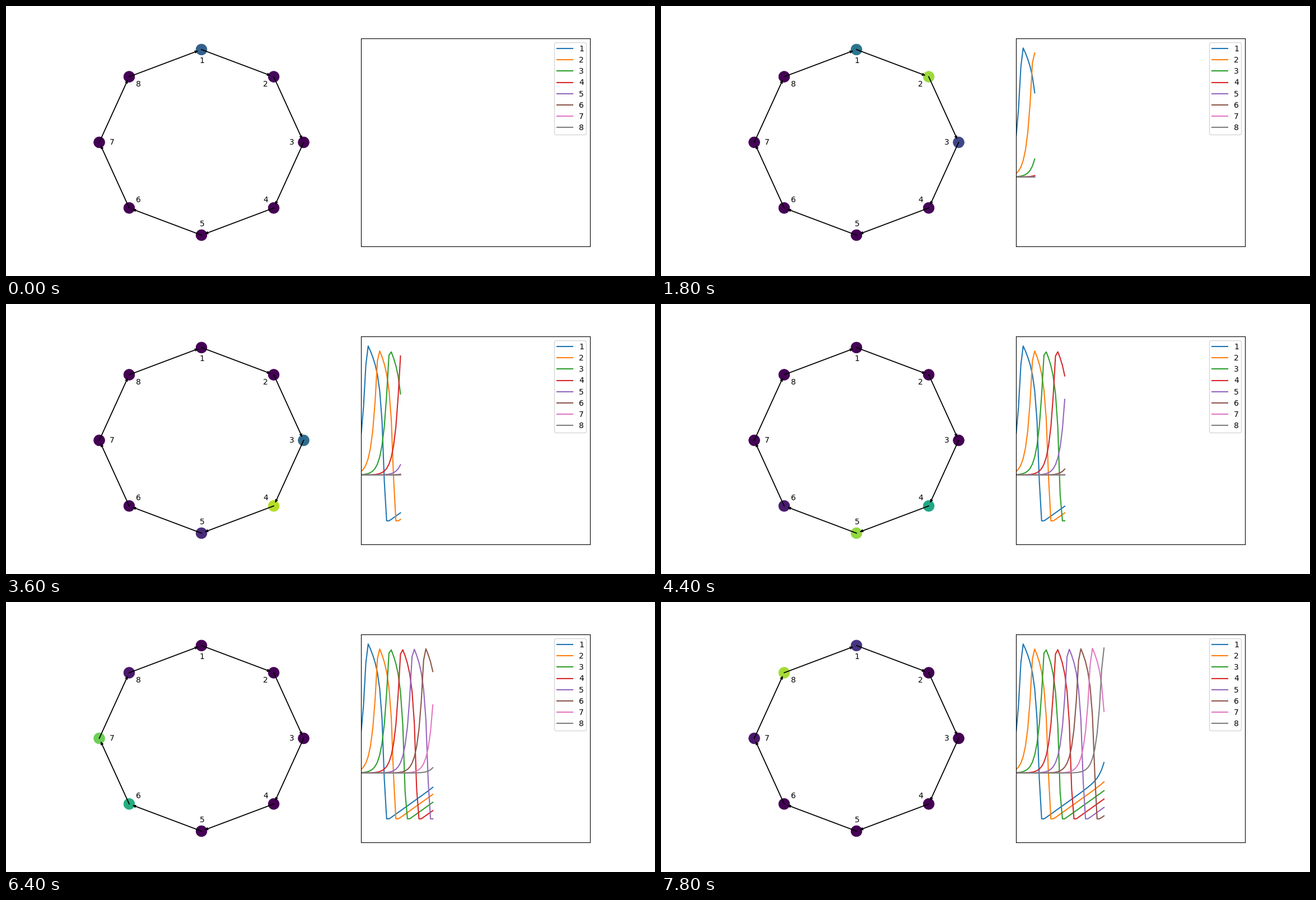
Animation of 1159x483 px, one loop 8 s. Source, as a matplotlib script:

```python
import numpy as np
import matplotlib.pyplot as plt
from matplotlib.animation import FuncAnimation

W, H, DPI = 1159, 483, 100
CELLS, STEPS, FRAMES, INTERVAL = 8, 100, 40, 200
TOP, BOTTOM = 248, -124          # voltage range of the plot
CENTER = np.array([349.05, 243.9])
RADII = np.array([182.5, 166.0])

steps = np.arange(FRAMES)


def arrival(n):
    """Time at which the pulse peaks in the nth cell it reaches."""
    return 5.11 * n - 2.45 + 0.4 * np.exp(1.3 * (2 - n))


def pulse(t, peak, onset):
    """Exponential rise, sagging plateau, collapse, then linear recovery."""
    s = t - peak
    rise = 390 * np.exp((t - onset) / 2)
    fall = 222 - 9 * s - 1.65 * np.exp(0.8 * s)
    spike = -28 * np.logaddexp(-rise / 28, -fall / 28)   # smooth minimum
    recovery = -82 + 2.95 * np.maximum(s - 8, 0)
    return np.maximum(spike, recovery)


def voltage(cell):
    peak, again = arrival(cell), arrival(cell + CELLS)
    onset = 3.3 if cell == 1 else peak       # the first cell is kicked early
    return pulse(steps, peak, onset) + pulse(steps, again, again)


volts = np.array([voltage(c) for c in range(1, CELLS + 1)])

fig = plt.figure(figsize=((W + .01) / DPI, (H + .01) / DPI), dpi=DPI,
                 facecolor="white")

# Ring of cells, in pixel coordinates
ring = fig.add_axes([0, 0, 1, 1])
ring.set(xlim=(0, W), ylim=(H, 0))
ring.axis("off")

angle = 2 * np.pi * np.arange(CELLS) / CELLS
unit = np.column_stack([np.sin(angle), -np.cos(angle)])
spots = CENTER + RADII * unit

nodes = ring.scatter(*spots.T, s=200, c=volts[:, 0], cmap="viridis",
                     vmin=0, vmax=TOP, linewidths=0.6, edgecolors="face",
                     zorder=1)


def arrow(a, b):
    d = (b - a) / np.hypot(*(b - a))
    side = np.array([-d[1], d[0]]) * 2.4
    tip = b - 6.8 * d
    base = tip - 5.5 * d
    ring.plot(*zip(a, base), color="black", lw=1.3, zorder=2)
    ring.fill(*zip(tip, base + side, base - side), facecolor="black",
              edgecolor="black", lw=0.5, zorder=2)


for i in range(CELLS):
    arrow(spots[i], spots[(i + 1) % CELLS])
    x, y = CENTER + 0.88 * RADII * unit[i]
    ring.text(x + 1, y - 0.3, str(i + 1), fontsize=10,
              ha="center", va="center")

# Voltage traces
chart = fig.add_axes([634.4 / W, 0.11, 408.2 / W, 0.77])
chart.set(xlim=(0, STEPS - 1), ylim=(BOTTOM, TOP), xticks=[], yticks=[])
traces = [chart.plot([], [], lw=1.5, label=str(i + 1))[0]
          for i in range(CELLS)]
legend = chart.legend(loc="upper right", fontsize=10, borderpad=0.36,
                      labelspacing=0.445, handletextpad=0.7)
for label in legend.get_texts():
    label.set_x(1.4)


def draw(k):
    nodes.set_array(volts[:, k])
    for trace, v in zip(traces, volts):
        trace.set_data(steps[:k], v[:k])
    return [nodes, *traces]


anim = FuncAnimation(fig, draw, frames=FRAMES, interval=INTERVAL,
                     init_func=lambda: draw(0), repeat=True, repeat_delay=0)
plt.show()
```
